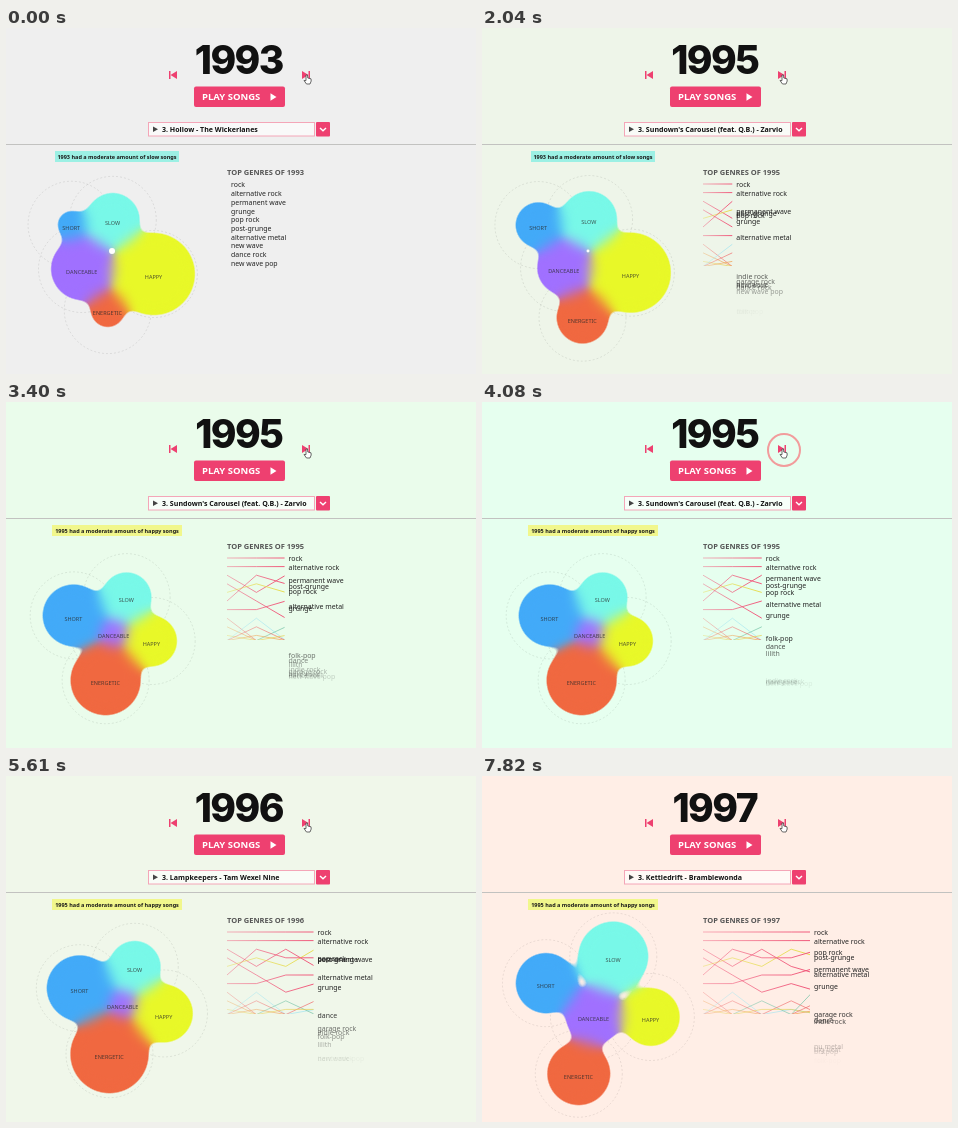
An HTML page with a canvas that plays this animation: 470x346 px, repeating every 7.99 s.

```html
<!DOCTYPE html>
<html lang="en">
<head>
<meta charset="utf-8">
<title>Music by year</title>
<style>
html, body { margin: 0; width: 100%; height: 100%; overflow: hidden; }
canvas, svg { position: absolute; left: 0; top: 0; width: 470px; height: 346px; }
svg text { font: 500 5.5px "Noto Sans", sans-serif; fill: rgba(40,40,40,.78); text-anchor: middle; }
</style>
</head>
<body>
<canvas id="page" width="470" height="346"></canvas>
<svg viewBox="0 0 470 346">
  <filter id="goo" filterUnits="userSpaceOnUse" x="0" y="120" width="240" height="226" color-interpolation-filters="sRGB">
    <feGaussianBlur stdDeviation="7" result="soft"/>
    <feColorMatrix in="soft" values="1 0 0 0 0  0 1 0 0 0  0 0 1 0 0  0 0 0 12 -5"/>
  </filter>
  <g id="circles" filter="url(#goo)"></g>
  <circle id="gap" cx="106" cy="223" fill="#fff"/>
  <g id="names"></g>
</svg>
<script>
const LOOP = 7990;
const PINK = '#ee4070';
const SANS = '"Noto Sans", sans-serif';
const ctx = document.getElementById('page').getContext('2d');

const clicks = [40, 1740, 4030, 6920];
const REACT = 300;                          // from click to the new year
const changes = clicks.map(c => c + REACT);

const songs = [
  '3. Hollow - The Wickerlanes',
  '3. Cold Harbor - The Lintmoors',
  "3. Sundown's Carousel (feat. Q.B.) - Zarvio",
  '3. Lampkeepers - Tam Wexel Nine',
  '3. Kettledrift - Bramblewonda'
];

// time and page colour
const papers = [
  [340, [239, 239, 239]], [2720, [238, 248, 231]], [4080, [230, 255, 239]],
  [6970, [248, 239, 230]], [7820, [255, 238, 230]]
];

// bubble radius in each year
const moods = {
  DANCEABLE: { color: '#a070ff', size: [31, 27, 13, 13, 29] },
  SLOW: { color: '#78f8e8', size: [27, 28, 25, 26, 35.5] },
  SHORT: { color: '#42aaf8', size: [14.5, 23, 31, 33, 30] },
  HAPPY: { color: '#e8f828', size: [41, 40, 25.5, 29, 29] },
  ENERGETIC: { color: '#f06840', size: [17.5, 26, 35, 39, 31] }
};
const hub = { x: [76, 82, 108, 117, 111.5], y: [241, 240, 231, 228, 241], tilt: [4, 4, 12, 13, 0] };

// rank in each year in hex, '-' is off the chart
const genres = [
  ['rock', '00000'], ['alternative rock', '11111'], ['permanent wave', '24245'],
  ['grunge', '35767'], ['pop rock', '43423'], ['post-grunge', '52332'],
  ['alternative metal', '66554'], ['new wave', '7----'], ['dance rock', '8----'],
  ['new wave pop', '9----'], ['indie rock', '-7-9-'], ['folk-pop', '--8--'],
  ['garage rock', '-8-8-'], ['hard rock', '-9---'], ['dance', '--99-'],
  ['lilith', '--a--'], ['nu metal', '----6'], ['big beat', '----8'], ['britpop', '----9']
].map(([name, ranks]) => ({ name, ranks: [...ranks].map(r => r === '-' ? 99 : parseInt(r, 16)) }));
const STEADY = 7;                           // genres that never leave the chart
const tints = ['#f07070', '#f0a050', '#e8d050', '#a0e4f0', '#78c4a8'];
const YEAR_W = 29.4;

const mix = (a, b, u) => a + (b - a) * u;
const clamp = v => Math.max(0, Math.min(1, v));
const easeOut = u => 1 - (1 - clamp(u)) ** 3;
const easeInOut = u => (1 - Math.cos(Math.PI * clamp(u))) / 2;

// years passed, each step easing out over the given time
const yearsAt = (t, span) => changes.reduce((sum, c) => sum + easeOut((t - c) / span), 0);

function at(list, pos) {
  const i = Math.min(Math.floor(pos), list.length - 2);
  return mix(list[i], list[i + 1], pos - i);
}

function text(str, x, y, font, color, align = 'left') {
  ctx.font = font;
  ctx.fillStyle = color;
  ctx.textAlign = align;
  ctx.fillText(str, x, y);
}

function path(...pts) {
  ctx.beginPath();
  for (let i = 0; i < pts.length; i += 2) ctx.lineTo(pts[i], pts[i + 1]);
}

function poly(color, ...pts) {
  ctx.fillStyle = color;
  path(...pts);
  ctx.fill();
}

function stroke(color, width) {
  ctx.strokeStyle = color;
  ctx.lineWidth = width;
  ctx.stroke();
}

function box(color, x, y, w, h, r = 0) {
  ctx.fillStyle = color;
  ctx.beginPath();
  ctx.roundRect(x, y, w, h, r);
  ctx.fill();
}

function circle(x, y, r) {
  ctx.beginPath();
  ctx.arc(x, y, r, 0, 7);
}

function setAttrs(node, attrs) {
  for (const key in attrs) node.setAttribute(key, attrs[key]);
}

function addSvg(tag, parent) {
  const home = document.getElementById(parent);
  return home.appendChild(document.createElementNS(home.namespaceURI, tag));
}

for (const name in moods) {
  const m = moods[name];
  m.circle = addSvg('circle', 'circles');
  m.circle.setAttribute('fill', m.color);
  m.label = addSvg('text', 'names');
  m.label.textContent = name;
}

// angle at the hub between two petals that touch the hub and each other
function petalAngle(r, a, b) {
  const p = r + a, q = r + b;
  return Math.acos((p * p + q * q - (a + b) ** 2) / (2 * p * q));
}

function placeMoods(pos) {
  const { DANCEABLE, SLOW, SHORT, HAPPY, ENERGETIC } = moods;
  for (const m of Object.values(moods)) m.r = at(m.size, pos);
  const r = DANCEABLE.r;
  const loose = clamp(pos - 3);             // petals drift apart in the last year
  DANCEABLE.x = at(hub.x, pos);
  DANCEABLE.y = at(hub.y, pos);
  HAPPY.turn = at(hub.tilt, pos) * Math.PI / 180;
  SLOW.turn = HAPPY.turn - petalAngle(r, HAPPY.r, SLOW.r) - .16 * loose;
  SHORT.turn = SLOW.turn - petalAngle(r, SLOW.r, SHORT.r) - .16 * loose;
  ENERGETIC.turn = HAPPY.turn + petalAngle(r, HAPPY.r, ENERGETIC.r) + .77 * loose;
  for (const m of [SLOW, SHORT, HAPPY, ENERGETIC]) {
    m.x = DANCEABLE.x + (r + m.r) * Math.cos(m.turn);
    m.y = DANCEABLE.y + (r + m.r) * Math.sin(m.turn);
  }
}

function drawMoods(pos) {
  placeMoods(pos);
  ctx.setLineDash([2, 2]);
  for (const { x, y, r, circle: dot, label } of Object.values(moods)) {
    circle(x, y, 43.5);
    stroke('rgba(0,0,0,.11)', .8);
    setAttrs(dot, { cx: x, cy: y, r });
    setAttrs(label, { x: x - .3, y: y + 5.2 });
  }
  ctx.setLineDash([]);
  document.getElementById('gap').setAttribute('r', Math.max(0, 3 - 1.5 * pos));
}

function drawHeader(year, song) {
  ctx.letterSpacing = '-1.6px';
  text(year, 232.8, 46.4, '800 39px Inter, sans-serif', '#111', 'center');
  ctx.letterSpacing = '0px';

  box(PINK, 163, 43, 1.5, 8);
  poly(PINK, 171, 43, 171, 51, 164.5, 47);
  box(PINK, 302.5, 43, 1.5, 8);
  poly(PINK, 296, 43, 296, 51, 302.5, 47);

  box(PINK, 188, 58.5, 91, 20.5, 2);
  text('PLAY SONGS', 196, 72.4, `600 9.5px ${SANS}`, '#fff');
  poly('#fff', 264.5, 65.3, 270.5, 69, 264.5, 72.7);

  box('rgba(255,255,255,.65)', 142.5, 94.5, 166, 13.5);
  ctx.strokeStyle = '#f4a6b8';
  ctx.lineWidth = 1;
  ctx.strokeRect(142.5, 94.5, 166, 13.5);
  poly('#444', 147, 98.5, 152, 101.3, 147, 104.1);
  text(song, 156, 104, `600 7.05px ${SANS}`, '#111');
  box(PINK, 310, 94, 14, 14.5, 1);
  path(314, 100, 317, 102.8, 320, 100);
  stroke('#fff', 1.4);

  box('#c2c2c0', 0, 116, 470, 1);
}

function drawBanner(late) {
  const half = late ? 65 : 62;
  box(late ? '#f1f78c' : '#9cf0e4', 111 - half, 123, half * 2, 11);
  text(late ? '1995 had a moderate amount of happy songs' : '1993 had a moderate amount of slow songs',
    111, 130.7, `700 5.53px ${SANS}`, '#181818', 'center');
}

// a label heads for its newest row, from wherever the last click caught it
function labelY(ranks, t) {
  const row = r => Math.min(285, 157 + 8.72 * r);
  return clicks.reduce((y, c, i) => {
    const until = Math.min(t, clicks[i + 1] ?? LOOP);
    return mix(y, row(ranks[i + 1]), easeInOut((until - c) / 3160));
  }, row(ranks[0]));
}

function drawLines(head) {
  ctx.save();
  ctx.beginPath();
  ctx.rect(221, 150, head - 221, 88);
  ctx.clip();
  genres.forEach(({ ranks }, i) => {
    const color = i === 4 ? '#e6dc50' : i < STEADY ? '#f0587a' : tints[(i - STEADY) % tints.length];
    const fade = ctx.createLinearGradient(221, 0, Math.max(head, 250), 0);
    fade.addColorStop(0, color + '70');
    fade.addColorStop(1, color);
    ctx.globalAlpha = i < STEADY ? 1 : .75;
    path(...ranks.flatMap((r, k) => [221 + YEAR_W * k, 156 + 8.6 * Math.min(r, 9.6)]));
    stroke(fade, 1);
  });
  ctx.restore();
}

function drawChart(t, year) {
  text('TOP GENRES OF ' + year, 221, 147, `600 7.5px ${SANS}`, '#555');
  const x = 225 + YEAR_W * yearsAt(t, 2080);
  if (x > 225) drawLines(x - 4);
  for (const { name, ranks } of genres) {
    const y = labelY(ranks, t);
    ctx.globalAlpha = clamp((285 - y) / 50);
    text(name, x, y + 2.4, `500 6.95px ${SANS}`, '#222');
  }
  ctx.globalAlpha = 1;
}

function drawPointer(pressed) {
  if (pressed) {
    circle(302, 48, 16);
    stroke('#f29c9c', 2);
  }
  poly('#fff', 300, 47, 301.5, 47, 301.8, 50, 305, 50.8, 305.2, 53, 304, 56, 300.5, 56, 298, 52.5, 300, 52.6);
  ctx.closePath();
  stroke('#444', .8);
}

function paperAt(t) {
  const i = Math.max(1, papers.findIndex(([end]) => t < end));
  const [[t0, a], [t1, b]] = t < papers.at(-1)[0] ? [papers[i - 1], papers[i]] : papers.slice(-2);
  const u = clamp((t - t0) / (t1 - t0));
  return `rgb(${a.map((v, k) => Math.round(mix(v, b[k], u)))})`;
}

function draw(t) {
  const step = changes.filter(c => t >= c).length;
  const year = 1993 + step;
  ctx.fillStyle = paperAt(t);
  ctx.fillRect(0, 0, 470, 346);
  drawMoods(yearsAt(t, 1000));
  drawHeader(year, songs[step]);
  drawBanner(t > 3100);
  drawChart(t, year);
  drawPointer(clicks.some(c => t > c && t < c + REACT - 20));
}

function tick() {
  draw(performance.now() % LOOP);
  requestAnimationFrame(tick);
}
tick();
</script>
</body>
</html>
```
